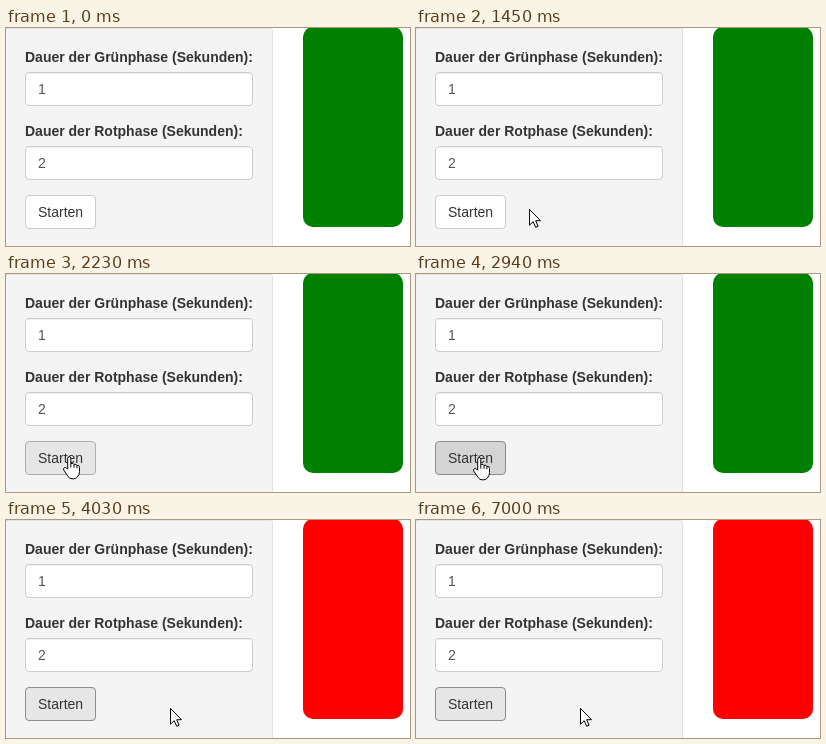
Write an HTML page that moves like this. It is 404 px wide and 218 px high and loops after 8 s.

```html
<!DOCTYPE html>
<html lang="de">
<head>
<meta charset="utf-8">
<title>Ampel</title>
<style>
  html, body { margin: 0; width: 100%; height: 100%; overflow: hidden; background: #fff; }
  svg { display: block; width: 404px; height: 218px; }
  text { font: 14px "Liberation Sans", Arial, sans-serif; fill: #333; }
  .label { font-weight: bold; }
  .value { fill: #555; }
  .field { fill: #fff; stroke: #ccc; }
  .inset { stroke: #000; stroke-opacity: .06; }
  .cursor { fill: #fff; stroke: #000; stroke-linejoin: round; }
</style>
</head>
<body>
<svg viewBox="0 0 404 218">
  <rect x="-.5" y="-.5" width="267" height="240" rx="3.5" fill="#f4f4f4" stroke="#e3e3e3"/>
  <path class="inset" d="M0 .5H264"/>

  <text class="label" x="19" y="34">Dauer der Grünphase (Sekunden):</text>
  <rect class="field" x="19.5" y="44.5" width="227" height="33" rx="3.5"/>
  <path class="inset" d="M22 45.5H244"/>
  <text class="value" x="32" y="66">1</text>

  <text class="label" x="19" y="108">Dauer der Rotphase (Sekunden):</text>
  <rect class="field" x="19.5" y="118.5" width="227" height="33" rx="3.5"/>
  <path class="inset" d="M22 119.5H244"/>
  <text class="value" x="32" y="140">2</text>

  <rect id="button" x="19.5" y="167.5" width="70" height="33" rx="3.5"/>
  <text x="32" y="189">Starten</text>

  <rect id="light" x="297" y="-1" width="100" height="200" rx="10"/>

  <path id="arrow" class="cursor" d="M.5 .4V16.2L4.2 12.7L6.7 18.3L9.1 17.2L6.7 11.7H11.5Z"/>
  <g id="hand" class="cursor">
    <path d="M4.7 13.2V2.4Q4.8 .6 6.3 .6Q7.8 .6 7.8 2.4V7.5Q10.5 6.7 11 8.4Q13.3 7.6 13.9 9.4Q16.5 8.9 16.5 11.4V15.5Q16.5 18.6 14.4 21Q13 22.8 10.7 22.8H9Q6.7 22.8 5.2 20.6L.9 14.3Q-.1 12.6 1.3 11.7Q2.6 11 3.8 12.3Z"/>
    <path fill="none" d="M7.8 7.5V11.5M11 8.4V11.8M13.9 9.4V12.2"/>
  </g>
</svg>
<script>
  const LOOP = 8000, STEP = 76;
  const ENTER = 840, HOVER = 1680, PRESS = 2940, RELEASE = 3010, LEAVE = 3180;
  const FIRST_RED = 4030, RED = 2040, GREEN = 930;

  const [button, light, arrow, hand] =
    ["button", "light", "arrow", "hand"].map(id => document.getElementById(id));

  // The pointer starts off stage and eases to the end of each move in turn.
  const origin = { x: 232, y: 222 };
  const moves = [
    { start: ENTER, steps: 9, x: 113, y: 181 },
    { start: 1530, steps: 2, x: 95, y: 184 },
    { start: HOVER, steps: 4, x: 60, y: 177 },
    { start: 2080, steps: 3, x: 57, y: 183 },
    { start: LEAVE, steps: 3, x: 164, y: 188 }
  ];

  const easeOut = p => 1 - (1 - p) ** 2;
  const within = (t, from, to) => t >= from && t < to;
  const show = (node, visible) => node.setAttribute("visibility", visible ? "visible" : "hidden");

  function pointerAt(t) {
    let { x, y } = origin;
    for (const move of moves) {
      if (t < move.start) break;
      const step = 1 + Math.floor((t - move.start) / STEP);
      const p = easeOut(Math.min(1, step / move.steps));
      x += (move.x - x) * p;
      y += (move.y - y) * p;
    }
    return [Math.round(x), Math.round(y)];
  }

  function drawButton(t, hovering) {
    const pressed = within(t, PRESS, RELEASE);
    const focused = t >= PRESS;
    button.setAttribute("fill", pressed ? "#d4d4d4" : hovering || focused ? "#e6e6e6" : "#fff");
    button.setAttribute("stroke",
      pressed ? "#8c8c8c" : hovering ? "#adadad" : focused ? "#8c8c8c" : "#ccc");
  }

  function render(t) {
    const hovering = within(t, HOVER, LEAVE);
    drawButton(t, hovering);

    const red = t >= FIRST_RED && (t - FIRST_RED) % (RED + GREEN) < RED;
    light.setAttribute("fill", red ? "#f00" : "#008000");

    const place = `translate(${pointerAt(t)})`;
    arrow.setAttribute("transform", place);
    hand.setAttribute("transform", place);
    show(arrow, t >= ENTER && !hovering);
    show(hand, hovering);
  }

  const start = performance.now();
  function tick() {
    render((performance.now() - start) % LOOP);
    requestAnimationFrame(tick);
  }
  tick();
</script>
</body>
</html>
```
